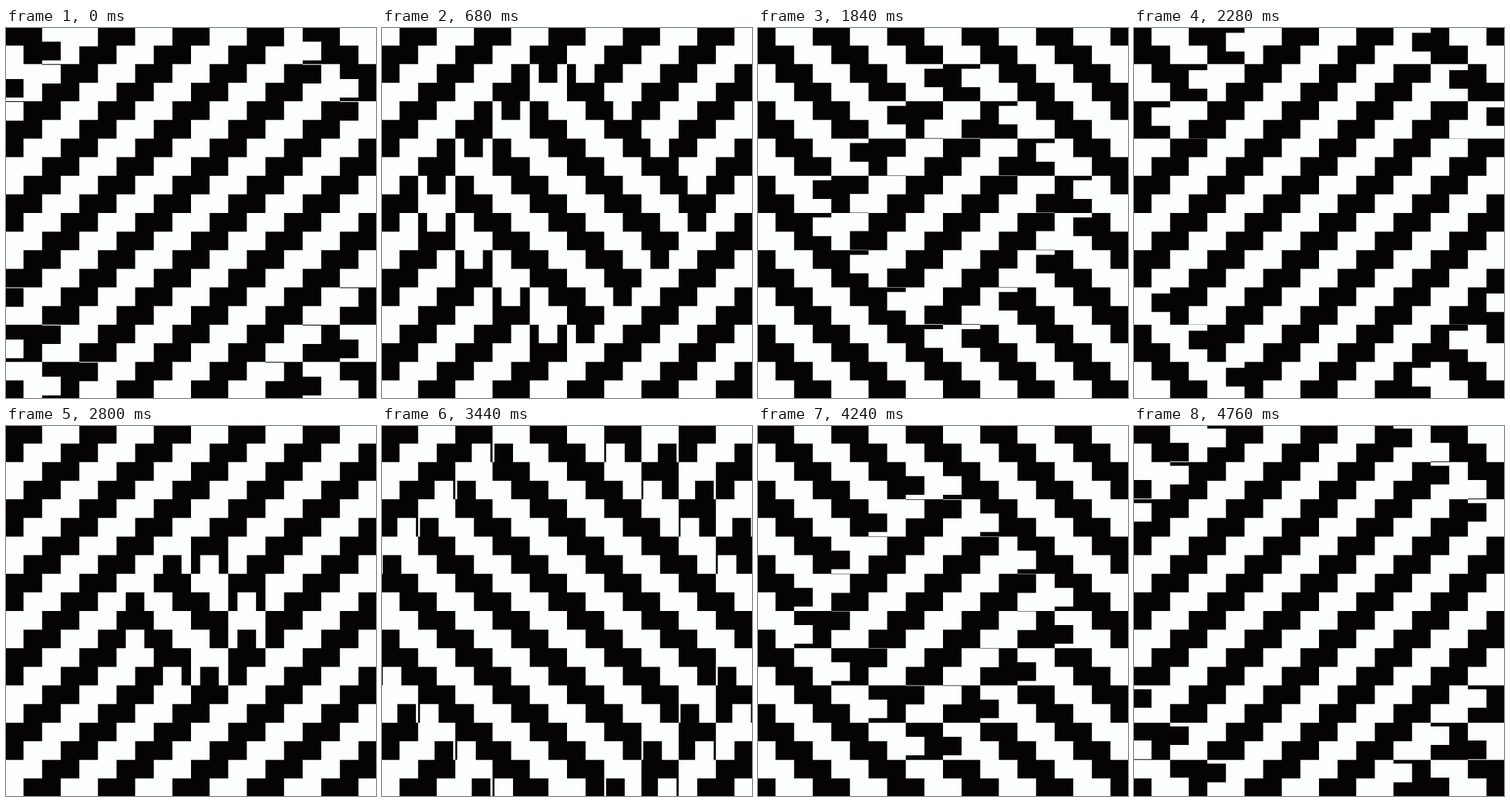
An HTML page with a canvas that plays this animation: 500x500 px, repeating every 4800 ms.

```html
<!DOCTYPE html>
<html lang="en">
<head>
<meta charset="utf-8">
<title>Turning stairs</title>
<style>
  html, body { margin: 0; width: 100%; height: 100%; overflow: hidden; background: #fbfefc; }
  canvas { display: block; width: 500px; height: 500px; }
</style>
</head>
<body>
<canvas id="stage" width="500" height="500"></canvas>
<script>
const ctx = document.getElementById('stage').getContext('2d');
const SIZE = 500, N = 20, PHASE = 1200, SWAP = 240;
const CELL = 25.15; // the grid reaches slightly past the stage on every side
const PAPER = '#fbfefc', INK = '#060304';

// Each phase starts from a stair pattern (slope, shift) and swaps neighbouring
// cells in every second row or column, spreading out from the middle.
const phases = [
  { slope: 1, shift: 3, rows: true, odd: 0, dir: 1 },
  { slope: -1, shift: 1, rows: false, odd: 1, dir: 1 },
  { slope: 1, shift: 0, rows: true, odd: 1, dir: -1 },
  { slope: -1, shift: 0, rows: false, odd: 0, dir: -1 }
];

const smooth = u => u * u * (3 - 2 * u);
const clamp = u => Math.max(0, Math.min(1, u));
const edge = i => SIZE / 2 + (i - N / 2) * CELL;

function stairs({ slope, shift }) {
  return Array.from({ length: N }, (_, r) =>
    Array.from({ length: N }, (_, c) => (c + slope * r + shift + 4 * N) % 4 < 2));
}

// Adds the cells from..to of one row or column to the current path.
function addBar(rows, line, from, to) {
  const a = edge(from), len = (to - from) * CELL;
  if (rows) ctx.rect(a, edge(line), len, CELL);
  else ctx.rect(edge(line), a, CELL, len);
}

// Applies finished swaps to the grid; pairs under way go straight to the path.
function advance(grid, { rows, odd, dir }, time) {
  const get = (line, i) => rows ? grid[line][i] : grid[i][line];
  const set = (line, i, v) => { if (rows) grid[line][i] = v; else grid[i][line] = v; };
  for (let line = odd; line < N; line += 2) {
    for (let i = 0; i < N; i += 2) {
      const dist = Math.abs(line - 9 - odd) + Math.abs(i + 1 - N / 2);
      const p = smooth(clamp((time + 4 - 71 * dist) / SWAP));
      if (p === 0) continue;
      const a = get(line, i), b = get(line, i + 1);
      set(line, i, p === 1 && b);
      set(line, i + 1, p === 1 && a);
      if (p === 1) continue;

      const at = dir > 0 ? i + p : i + 1 - p;
      if (dir > 0 ? a : b) {
        addBar(rows, line, at, at + 1);
      } else {
        addBar(rows, line, i, at);
        addBar(rows, line, at + 1, i + 2);
      }
    }
  }
}

function draw(t) {
  const k = Math.floor(t / PHASE) % 4, elapsed = t % PHASE;
  const last = phases[(k + 3) % 4];
  const grid = stairs(last);

  ctx.fillStyle = PAPER;
  ctx.fillRect(0, 0, SIZE, SIZE);
  ctx.beginPath();
  advance(grid, last, elapsed + PHASE);
  advance(grid, phases[k], elapsed);
  grid.forEach((row, r) => row.forEach((on, c) => { if (on) addBar(true, r, c, c + 1); }));
  ctx.fillStyle = INK;
  ctx.fill();
}

const begin = performance.now();
function tick(now) {
  draw(Math.max(0, now - begin) % (4 * PHASE));
  requestAnimationFrame(tick);
}
draw(0);
requestAnimationFrame(tick);
</script>
</body>
</html>
```
